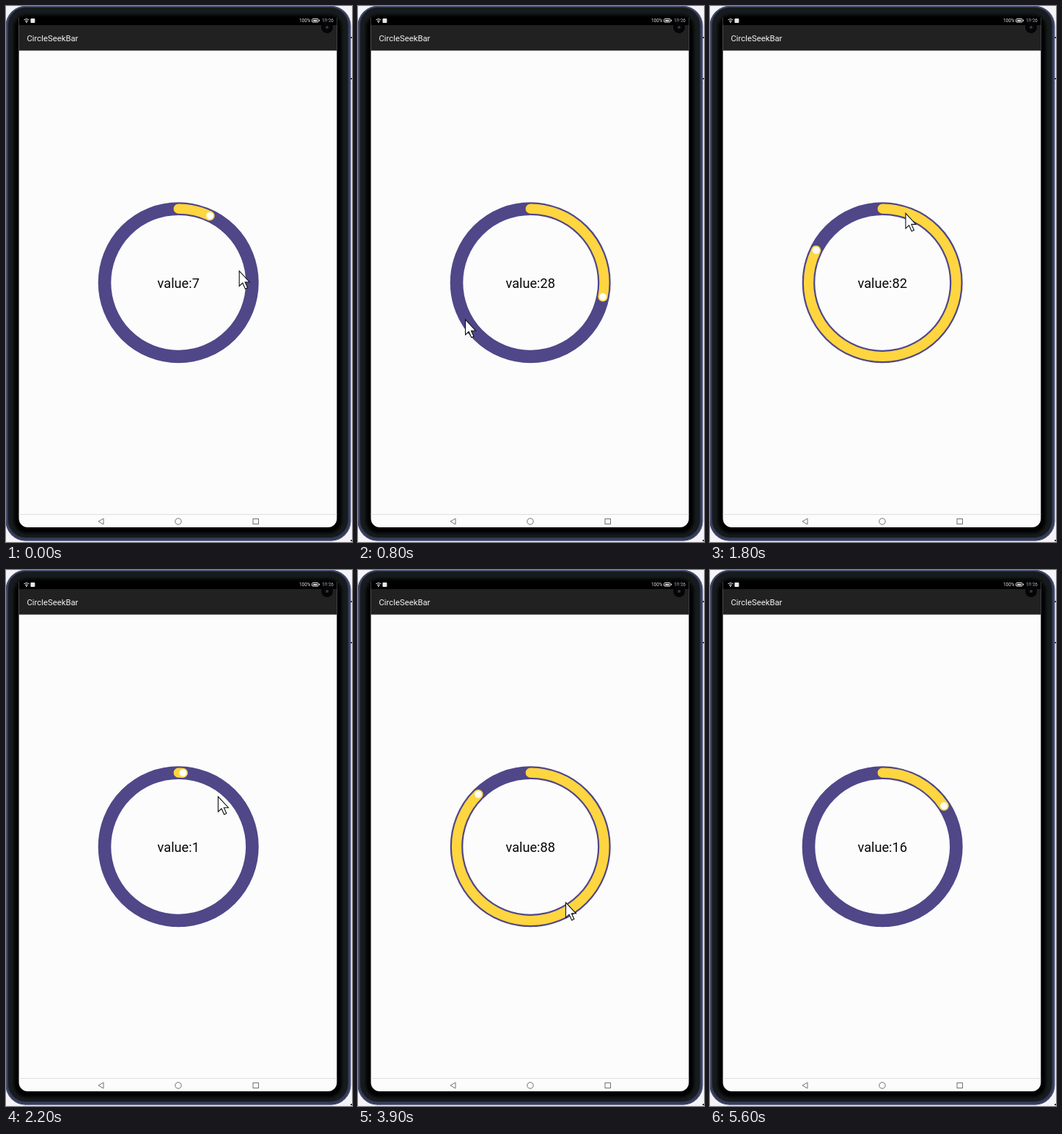
An HTML page that plays this animation: 472x730 px, repeating every 5.7 s.

```html
<!DOCTYPE html>
<html lang="en">
<head>
<meta charset="utf-8">
<title>CircleSeekBar</title>
<style>
  html, body { margin: 0; width: 100%; height: 100%; overflow: hidden; background: #f4f4f8; }
  svg { display: block; width: 472px; height: 730px; }
  text { font-family: Roboto, "Open Sans", sans-serif; }
</style>
</head>
<body>
<svg viewBox="0 0 472 730">
  <defs>
    <clipPath id="screen"><path d="M17.6 16H451.3V698a12 12 0 0 1-12 12H29.6a12 12 0 0 1-12-12Z"/></clipPath>
    <filter id="soft"><feGaussianBlur stdDeviation="2"/></filter>
  </defs>

  <!-- tablet body -->
  <path d="M470 42h2v2h-2zM470 98h2v2h-2zM470 727h2v2h-2z" fill="#30344e"/>
  <rect x="-.5" width="471" height="728.5" rx="27" fill="#343a58"/>
  <rect x=".5" y=".5" width="469" height="727.5" rx="26" fill="none" stroke="#525a7c"/>
  <rect x="3" y="2" width="463.5" height="722" rx="24" fill="#171b1d"/>
  <rect x="11" y="12" width="447" height="706" rx="17" fill="#020303" filter="url(#soft)"/>

  <!-- app -->
  <g clip-path="url(#screen)">
    <rect x="17" y="16" width="435" height="694" fill="#fcfcfc"/>
    <rect x="17" y="16" width="435" height="10" fill="#000"/>
    <rect x="17" y="26" width="435" height="34.7" fill="#212121"/>
    <path d="M17 692.5H452" stroke="#dedede"/>
  </g>
  <g fill="none" stroke="#e8e8e8">
    <path d="M24.5 18.8q3.5-2.6 7 0M26 20.6q2-1.5 4 0"/>
    <rect x="417.5" y="17.5" width="8.5" height="4.5" rx="1"/>
    <path d="M427.5 18.7v2"/>
  </g>
  <g fill="#e8e8e8" font-size="6.4">
    <circle cx="28" cy="22" r=".9"/>
    <rect x="33.5" y="17" width="6" height="6" rx="1"/>
    <rect x="419" y="19" width="5.5" height="1.8"/>
    <text x="400" y="22.3">100%</text>
    <text x="431" y="22.3" fill="#bbb">10:26</text>
  </g>
  <circle cx="438" cy="29" r="8" fill="#050507"/>
  <circle cx="438" cy="29" r="2" fill="#34353f"/>
  <text x="28.5" y="48" font-size="11.3" fill="#f4f4f4">CircleSeekBar</text>
  <g fill="none" stroke="#727272">
    <path d="M126 702l7-4v8z"/>
    <circle cx="235" cy="702" r="4.2"/>
    <rect x="337" y="698.5" width="7.5" height="7"/>
  </g>

  <!-- seek bar, drawn around its own centre -->
  <g transform="translate(235.2 376.8)">
    <g fill="none">
      <circle r="100.7" stroke="#4f4788" stroke-width="17.6"/>
      <circle id="arc" r="100.7" pathLength="100" transform="rotate(-90)" stroke="#ffd540" stroke-width="13.2" stroke-linecap="round"/>
    </g>
    <circle id="knob" cy="-100.7" r="4.7" fill="#fff" stroke="#fff0bd"/>
    <text id="label" y="7.2" font-size="18.2" text-anchor="middle" fill="#080808">value:7</text>
    <path id="cursor" d="M0 0V20.5L4.6 16.3L8.2 24.3L11.4 22.8L7.9 15H14Z" fill="#fff" stroke="#111" stroke-width="1.1"/>
  </g>
</svg>
<script>
  const LOOP = 5700, STEP = 100;
  const LAG = 700;       // the bar trails the pointer by this much
  const RELEASE = 4600;  // the pointer then leaves the stage
  const LEAVE = 500;
  const [arc, knob, label, cursor] =
    ['arc', 'knob', 'label', 'cursor'].map(id => document.getElementById(id));

  // Pointer drag: time, percent of a lap, distance from the centre
  const drag = [
    [-700, 7, 85], [0, 22, 84.5], [400, 46.2, 88], [1300, 92.5, 119.5],
    [1500, 101, 109], [2200, 110.7, 87], [2600, 110.4, 90],
    [3300, 83.7, 145], [3900, 41, 90], [4200, 15.7, 67]
  ];

  const mix = (a, b, p) => a + (b - a) * p;

  function pointer(t) {
    const i = drag.findIndex(k => k[0] >= t);
    const b = drag.at(i), a = i > 0 ? drag[i - 1] : b;
    const p = a === b ? 0 : (t - a[0]) / (b[0] - a[0]);
    return { lap: mix(a[1], b[1], p), r: mix(a[2], b[2], p) };
  }

  function draw(t) {
    const value = pointer(t - LAG).lap % 100;
    arc.setAttribute('stroke-dasharray', `${value} 200`);
    knob.setAttribute('transform', `rotate(${value * 3.6})`);
    label.textContent = 'value:' + Math.round(value);

    const { lap, r } = pointer(t), angle = lap / 50 * Math.PI;
    const gone = Math.min(1, Math.max(0, (t - RELEASE) / LEAVE)) ** 1.5;
    const x = mix(r * Math.sin(angle), -190, gone);
    const y = mix(-r * Math.cos(angle), 390, gone);
    cursor.setAttribute('transform', `translate(${x} ${y})`);
  }

  function tick() {
    draw(Math.floor(performance.now() % LOOP / STEP) * STEP);
    requestAnimationFrame(tick);
  }
  tick();
</script>
</body>
</html>
```
